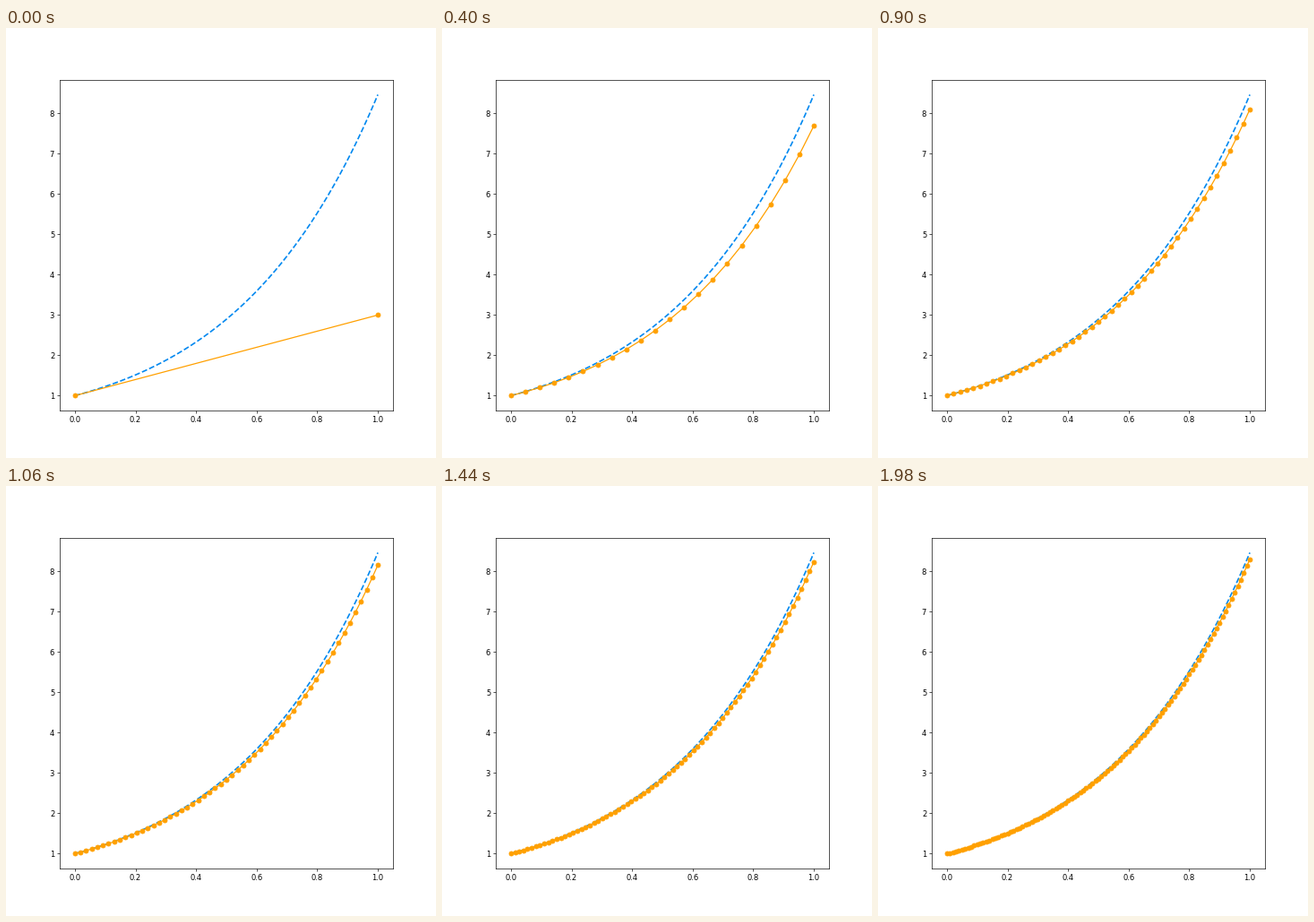
A matplotlib script that plays this animation: 480 px wide and 480 px high, repeating every 2 s.

```python
import numpy as np
import matplotlib.pyplot as plt
from matplotlib.animation import FuncAnimation

FRAMES = 100
BLUE, ORANGE = "#0088f0", "#ffa000"


def slope(t, y):
    return 2 * y + t


def euler(steps, y0=1.0):
    """Integrate y' = slope(t, y) over [0, 1] with equal steps."""
    t = np.linspace(0, 1, steps + 1)
    y = np.full(steps + 1, y0)
    for i in range(steps):
        y[i + 1] = y[i] + slope(t[i], y[i]) / steps
    return t, y


fig, ax = plt.subplots(figsize=(8, 8), dpi=60)
ax.plot(*euler(1000), "--", color=BLUE, lw=2)
approx, = ax.plot(*euler(1), "o-", color=ORANGE)


def update(k):
    approx.set_data(*euler(k + 1))
    return approx,


anim = FuncAnimation(fig, update, frames=FRAMES, interval=20,
                     repeat=True, repeat_delay=0)
plt.show()
```
